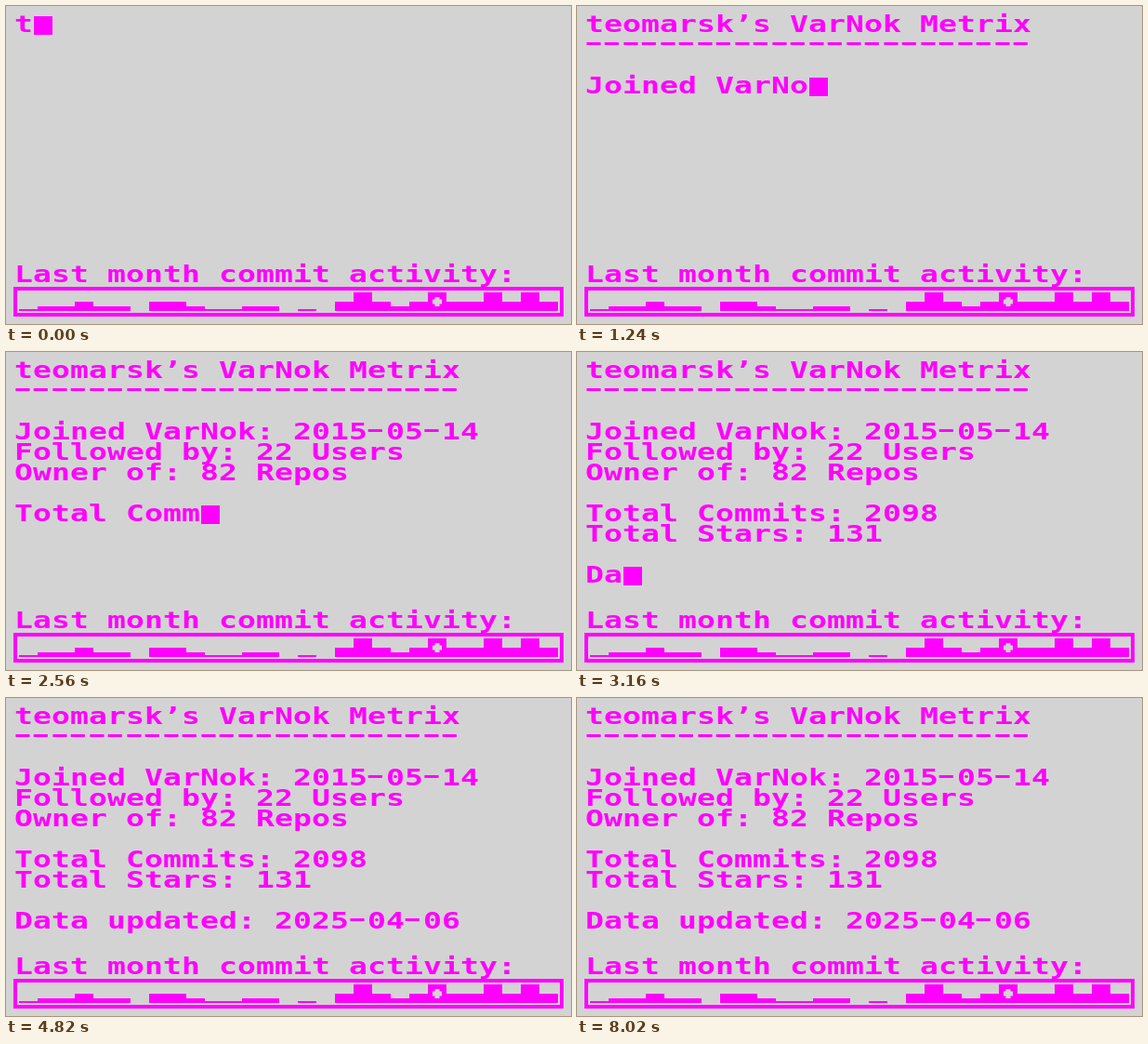
Recreate the animation shown at these times as an HTML page. Size 608 px wide and 342 px high, loop 8.42 s.

```html
<!DOCTYPE html>
<html lang="en">
<head>
<meta charset="utf-8">
<title>Commit terminal</title>
<style>
  :root { --ink: #f0f; --paper: #d3d3d3; }
  html, body { margin: 0; width: 100%; height: 100%; overflow: hidden; background: var(--paper); }
  #stage { position: relative; width: 608px; height: 342px; overflow: hidden; background: var(--paper); }
  .row {
    position: absolute; left: 9px; height: 22px;
    font: bold 24px/22px "DejaVu Sans Mono", monospace;
    color: var(--ink); white-space: pre;
    transform: scaleX(calc(20 / 14.5)); transform-origin: 0 0;
  }
  .row span { display: inline-block; width: 14.5px; height: 22px; vertical-align: top; }
  .row .dash {
    color: transparent;
    background: linear-gradient(var(--ink), var(--ink)) .7px 8px / 11px 3px no-repeat;
  }
  #cursor { position: absolute; width: 20px; height: 20px; background: var(--ink); }
  svg { position: absolute; left: 0; top: 0; }
</style>
</head>
<body>
<div id="stage">
  <svg width="608" height="342" fill="#f0f" shape-rendering="crispEdges">
    <rect x="10" y="304" width="588" height="28" fill="none" stroke="#f0f" stroke-width="4"/>
    <g id="bars"></g>
    <path fill="#d3d3d3" shape-rendering="auto" d="M461.5 313h5v2.5h2.5v5h-2.5v2.5h-5v-2.5h-2.5v-5h2.5z"/>
  </svg>
  <div id="cursor"></div>
</div>
<script>
const LOOP = 8420, STEP = 20, BLINK_FROM = 4020, BLINK = 400;
const CELL = 20, LINE = 22;
const title = "teomarsk’s VarNok Metrix";
const lines = [
  title,
  "-".repeat(title.length),
  "",
  "Joined VarNok: 2015-05-14",
  "Followed by: 22 Users",
  "Owner of: 82 Repos",
  "",
  "Total Commits: 2098",
  "Total Stars: 131",
  "",
  "Data updated: 2025-04-06"
];
const stage = document.getElementById("stage");
const cursor = document.getElementById("cursor");

function addRow(text, top) {
  const row = document.createElement("div");
  row.className = "row";
  row.style.top = top + "px";
  const cells = [...text].map(ch => {
    const cell = document.createElement("span");
    cell.textContent = ch;
    if (ch === "-") cell.className = "dash";
    row.append(cell);
    return cell;
  });
  stage.append(row);
  return cells;
}

// One entry per typed key: the cell it reveals and where the cursor goes next.
const keys = [];
lines.forEach((text, r) => {
  if (r) keys.push({ col: 0, row: r });
  addRow(text, 9 + r * LINE).forEach((cell, c) => keys.push({ cell, col: c + 1, row: r }));
});
addRow("Last month commit activity:", 278);

// Each digit is a bar level; a level doubles the height of the one before.
const levels = "12232203321122010343234334343";
const bars = document.getElementById("bars");
[...levels].forEach((level, i) => {
  if (level === "0") return;
  const h = 1.25 * 2 ** level;
  const bar = document.createElementNS("http://www.w3.org/2000/svg", "rect");
  const box = { x: 14 + i * CELL, y: 328 - h, width: CELL, height: h };
  for (const name in box) bar.setAttribute(name, box[name]);
  bars.append(bar);
});

function draw(t) {
  const typed = Math.min(keys.length, Math.floor(t / STEP) + 1);
  keys.forEach(({ cell }, i) => {
    if (cell) cell.style.visibility = i < typed ? "visible" : "hidden";
  });
  const { col, row } = keys[typed - 1];
  cursor.style.left = 10 + col * CELL + "px";
  cursor.style.top = 11 + row * LINE + "px";
  const lit = t < BLINK_FROM || Math.floor((t - BLINK_FROM) / BLINK) % 2 === 1;
  cursor.style.visibility = lit ? "visible" : "hidden";
}

const start = performance.now();
function tick() {
  draw((performance.now() - start) % LOOP);
  requestAnimationFrame(tick);
}
tick();
</script>
</body>
</html>
```
